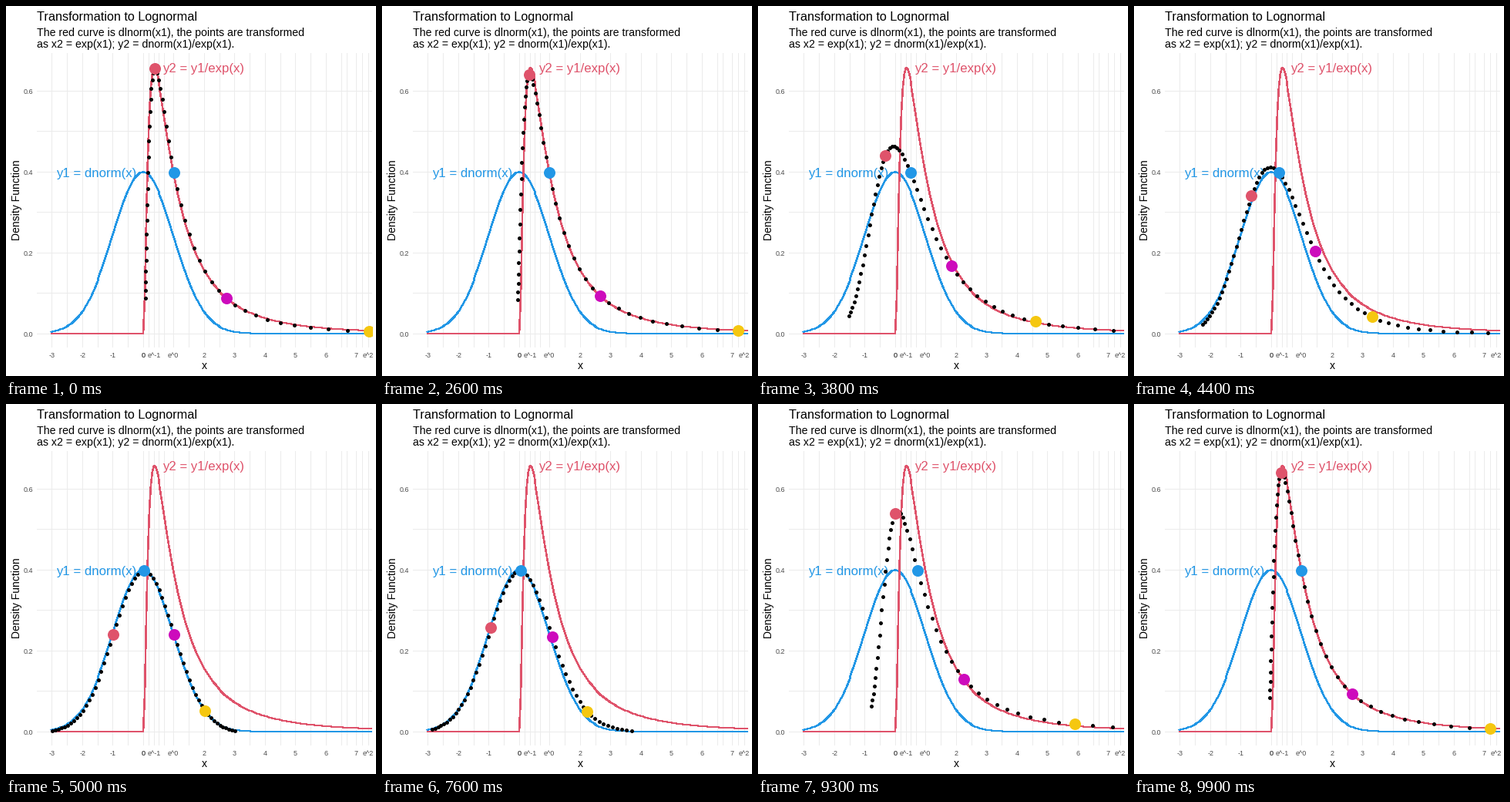
Write a matplotlib script that moves like this. It is 480 px wide and 480 px high and loops after 10 s.

```python
import numpy as np
import matplotlib.pyplot as plt
from matplotlib.animation import FuncAnimation
from matplotlib.patches import Rectangle

plt.rcParams["font.family"] = "Liberation Sans"

SIZE, DPI = 480, 72
RED, BLUE, PURPLE, YELLOW = "#DF536B", "#2297E6", "#CD0BBC", "#F5C710"
GRID, TICK = "#EBEBEB", "#4D4D4D"
LEFT, RIGHT, TOP, BOTTOM = 40, 475, 61, 443
STEPS = 25


def px(x):
    return np.floor(178.25 + 39.5 * np.asarray(x, float))


def py(y):
    return np.floor(425.4 - 525 * np.asarray(y, float))


def dnorm(x):
    return np.exp(-x**2 / 2) / np.sqrt(2 * np.pi)


def dlnorm(x):
    pos = np.maximum(x, 1e-9)
    return np.where(x > 1e-9, dnorm(np.log(pos)) / pos, 0)


fig = plt.figure(figsize=(SIZE / DPI, SIZE / DPI), dpi=DPI, facecolor="white")
ax = fig.add_axes([0, 0, 1, 1])
ax.set_xlim(0, SIZE)
ax.set_ylim(SIZE, 0)
ax.axis("off")
panel = Rectangle((LEFT, TOP), RIGHT - LEFT, BOTTOM - TOP, fc="none", ec="none")
ax.add_patch(panel)


def draw(x, y, **style):
    """Crisp line or markers on the pixel grid, kept inside the panel."""
    line, = ax.plot(x, y, antialiased=False, snap=False, **style)
    line.set_clip_path(panel)
    return line


def label(x, y, text, size, color="black", ha="left", **kw):
    ax.text(x, y, text, fontsize=size, color=color, ha=ha, va="baseline", **kw)


# grid: major breaks and the midpoints between them
e = np.exp([-1, 0, 2])
x_breaks = np.concatenate([np.arange(-3, 1), [0], e[:2], np.arange(2, 8), e[2:]])
x_names = ["-3", "-2", "-1", "0", "0", "e^-1", "e^0", *"234567", "e^2"]
x_minor = (x_breaks[1:] + x_breaks[:-1]) / 2
x_extra = [(0 + e[1]) / 2, (6 + e[2]) / 2]
for x in px(np.concatenate([x_breaks, x_minor, x_extra])) + 0.5:
    draw([x, x], [TOP, BOTTOM], color=GRID, lw=1, zorder=1)
for y in py(np.arange(7) / 10) + 0.5:
    draw([LEFT, RIGHT], [y, y], color=GRID, lw=1, zorder=1)

# axes and titles
for x, name in zip(px(x_breaks), x_names):
    label(x + 0.2, 456, name, 9, TICK, "center")
for y in (0, 0.2, 0.4, 0.6):
    label(35.3, py(y) + 4, f"{y:.1f}", 9, TICK, "right")
label(257.2, 471, "x", 14, ha="center")
label(18, 252, "Density Function", 14, ha="center", rotation=90,
      rotation_mode="anchor")
label(39.6, 19, "Transformation to Lognormal", 16.2)
label(39.6, 39, "The red curve is dlnorm(x1), the points are transformed", 14.1)
label(39.6, 54, "as x2 = exp(x1); y2 = dnorm(x1)/exp(x1).", 14.1)

# curves
xs = np.arange(-60, 161) / 20
for density, color in ((dnorm, BLUE), (dlnorm, RED)):
    draw(px(xs), py(density(xs)), color=color, lw=1.6, zorder=2)
label(117, 222, "y1 = dnorm(x)", 16.7, BLUE, "center")
label(203, 86, "y2 = y1/exp(x)", 16.7, RED)


def points(x1, color, size, zorder):
    dots = draw([], [], color=color, ls="", marker="o", ms=size, mew=0,
                zorder=zorder)
    return np.array(x1, float), dots


groups = [points(np.arange(-30, 31) / 10, "black", 5, 5)]
for x1, color in zip((-1, 0, 1, 2), (RED, BLUE, PURPLE, YELLOW)):
    groups.append(points([x1], color, 15, 6))


def share(i):
    """Weight of the lognormal position at step i."""
    if i <= 50:
        return 1 - max(0, i - STEPS) / STEPS
    return max(0, i - 75) / STEPS


def update(i):
    s = share(i)
    for x1, dots in groups:
        x2, y1 = np.exp(x1), dnorm(x1)
        dots.set_data(px(x1 + s * (x2 - x1)) + 0.5,
                      py(y1 + s * (y1 / x2 - y1)) + 0.5)
    return [dots for _, dots in groups]


anim = FuncAnimation(fig, update, frames=100, interval=100, repeat=True,
                     repeat_delay=0, init_func=lambda: update(0))
plt.show()
```
